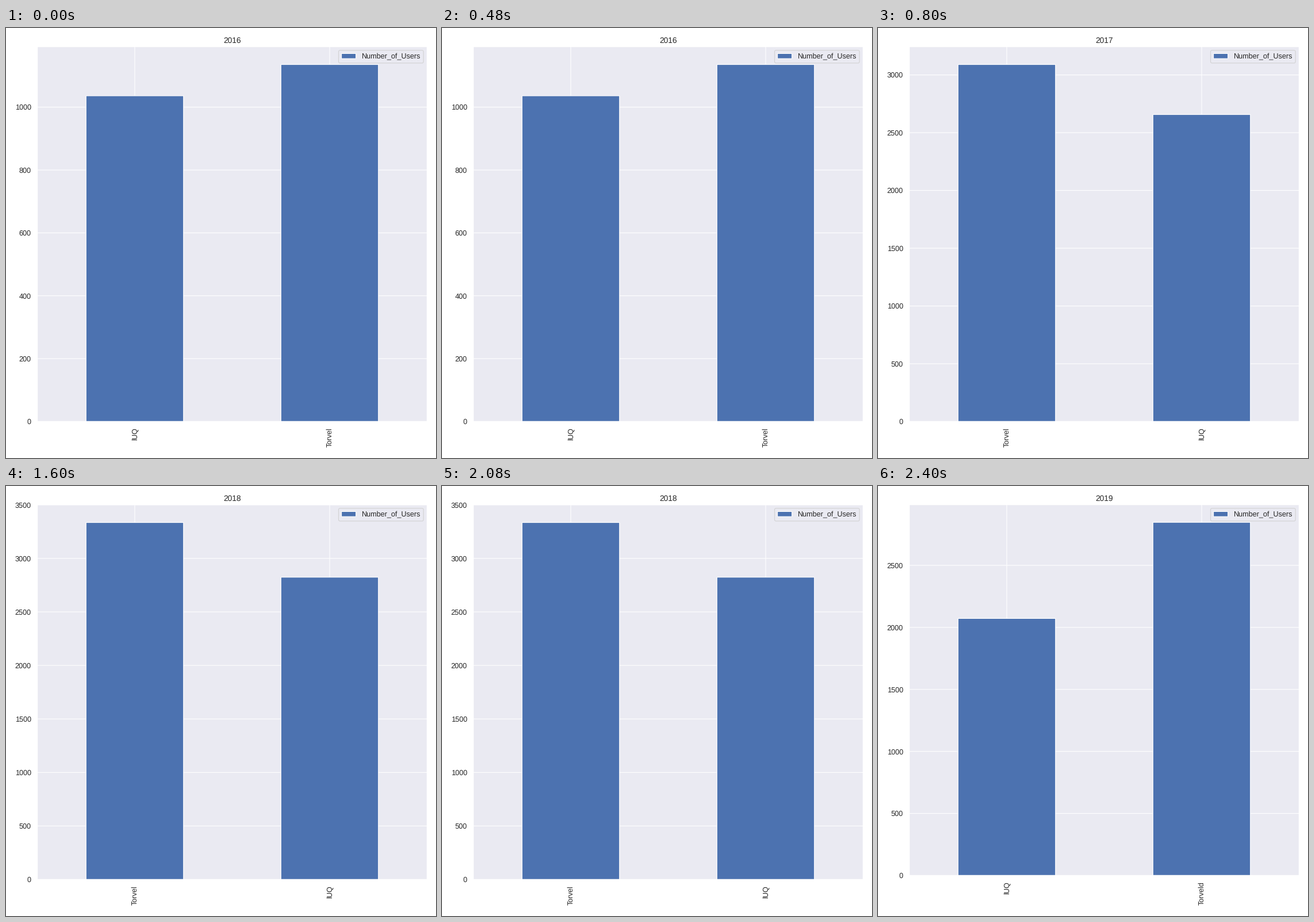
A matplotlib script that plays this animation: 748 px wide and 748 px high, repeating every 3200 ms.

```python
import matplotlib.pyplot as plt
from matplotlib.animation import FuncAnimation
from matplotlib.ticker import MultipleLocator

SIZE, DPI = 748, 100
PT = 0.823  # scales nominal point sizes to the stage
INK, BLUE, PANEL = "#262626", "#4C72B0", "#EAEAF2"
LEFT, RIGHT, TOP = 54.5, 732.5, 32.5

plt.rcParams.update({
    "font.family": "Liberation Sans",
    "text.color": INK,
    "text.hinting": "none",
    "path.snap": False,
    "axes.axisbelow": True,
    "axes.edgecolor": "white",
    "axes.linewidth": 1.25 * PT,
    "patch.linewidth": PT,
})

# title, bar labels, values, tick step, bottom edge of the panel in pixels
YEARS = [
    ("2016", ("lUQ", "Torvel"), (1036, 1135.5), 200, 684.5),
    ("2017", ("Torvel", "lUQ"), (3090, 2657), 500, 684.5),
    ("2018", ("Torvel", "lUQ"), (3335, 2824), 500, 684.5),
    ("2019", ("lUQ", "Torveld"), (2072, 2847), 500, 677.5),
]

fig = plt.figure(figsize=(SIZE / DPI, SIZE / DPI), dpi=DPI, facecolor="white")
ax = fig.add_subplot()


def draw(i):
    title, labels, values, step, bottom = YEARS[i]
    ax.clear()
    ax.set_position([LEFT / SIZE, 1 - bottom / SIZE,
                     (RIGHT - LEFT) / SIZE, (bottom - TOP) / SIZE])
    ax.set_facecolor(PANEL)
    ax.grid(color="white", linewidth=PT)
    ax.bar((0, 1), values, width=0.5, color=BLUE, edgecolor="white",
           linewidth=PT, label="Number_of_Users")
    ax.set_xlim(-0.5, 1.5)
    ax.set_ylim(0, max(values) * 1.05)
    ax.yaxis.set_major_locator(MultipleLocator(step))
    ax.set_xticks((0, 1), labels, rotation=90)
    ax.tick_params(length=0, pad=9.5 * PT, labelsize=11 * PT, labelcolor=INK)
    ax.set_title(title, fontsize=12 * PT, pad=6 * PT)
    ax.legend(loc="upper right", fontsize=11 * PT, facecolor=PANEL,
              edgecolor="0.8", framealpha=0.8)
    return ax.get_children()


anim = FuncAnimation(fig, draw, frames=len(YEARS), interval=800,
                     repeat=True, repeat_delay=0, blit=False)
plt.show()
```
